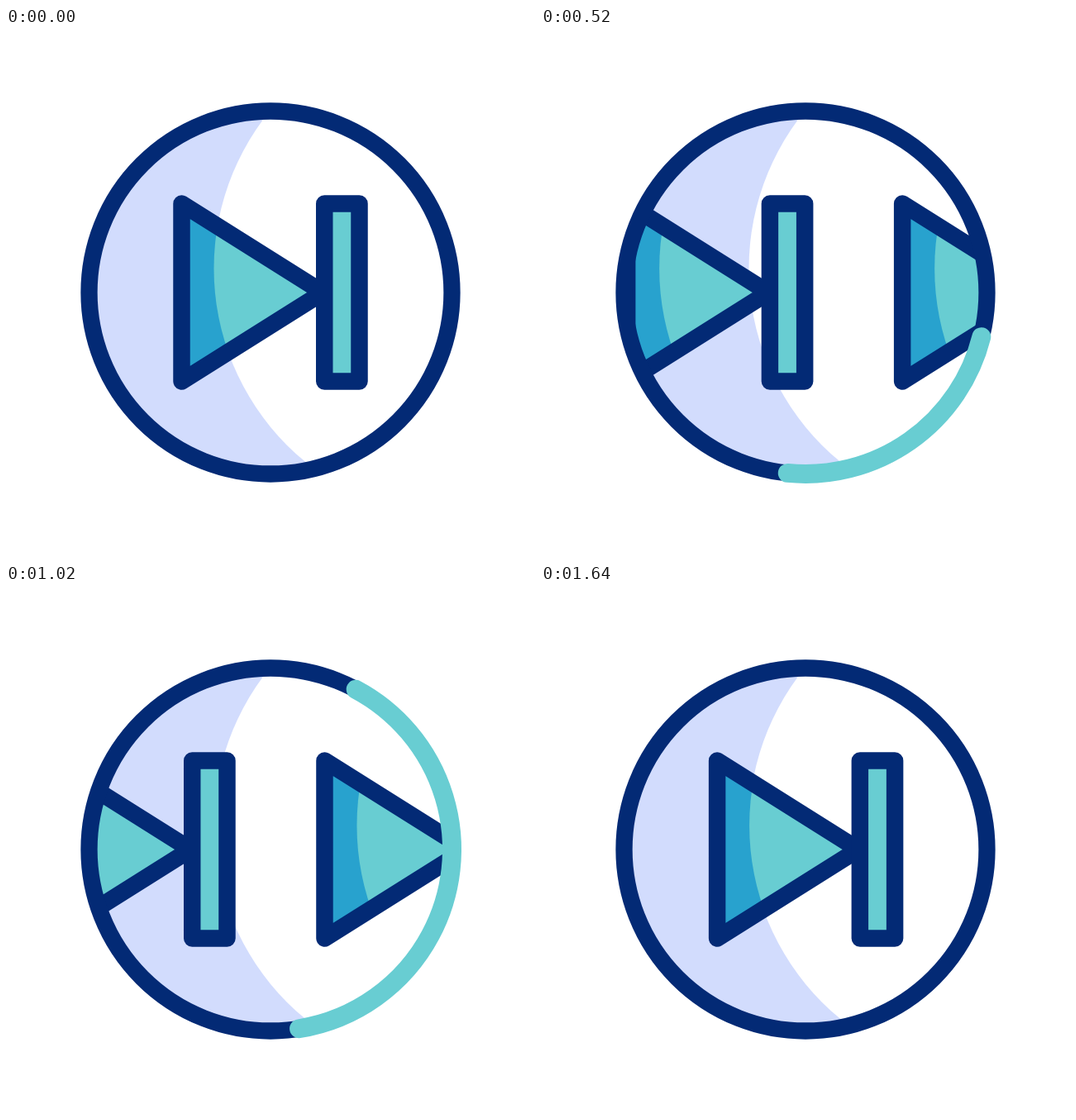
Recreate the animation shown at these times as an HTML page with a canvas. Size 640x640 px, loop 2.42 s.

```html
<!DOCTYPE html>
<html lang="en">
<head>
<meta charset="utf-8">
<title>Skip button</title>
<style>
  html, body { margin: 0; width: 100%; height: 100%; overflow: hidden; background: #fff; }
  canvas { display: block; width: 640px; height: 640px; }
</style>
</head>
<body>
<canvas id="stage" width="640" height="640"></canvas>
<script>
const ctx = document.getElementById('stage').getContext('2d');
const NAVY = '#032a75', TEAL = '#68cdd2', BLUE = '#28a2ce', LILAC = '#d2dcfd';
const LOOP = 2420, STEP = 20;
const C = 320, RADIUS = 219.5;
const SPACING = 333, TRAVEL = 1332.6, SCROLL_MS = 1600, SWEEP_MS = 1620;

// Cubic bezier easing with control points (x1, 0) and (x2, 1).
function ease(x, x1, x2) {
  if (x <= 0) return 0;
  if (x >= 1) return 1;
  let lo = 0, hi = 1;
  for (let i = 0; i < 30; i++) {
    const s = (lo + hi) / 2, r = 1 - s;
    if (3 * r * r * s * x1 + 3 * r * s * s * x2 + s * s * s < x) lo = s;
    else hi = s;
  }
  return lo * lo * (3 - 2 * lo);
}

function circlePath(x, y, r) {
  ctx.beginPath();
  ctx.arc(x, y, r, 0, Math.PI * 2);
}

function trianglePath() {
  ctx.beginPath();
  ctx.moveTo(212.5, 212.5);
  ctx.lineTo(383.4, 320);
  ctx.lineTo(212.5, 427.5);
  ctx.closePath();
}

// Fills the current path in two tones, split by a large circle.
function fillShaded(dark, light) {
  ctx.save();
  ctx.clip();
  ctx.fillStyle = dark;
  ctx.fillRect(0, 0, 640, 640);
  ctx.fillStyle = light;
  circlePath(554, 291, 302.5);
  ctx.fill();
  // The circle's far side stays light.
  ctx.fillRect(500, 0, 140, 640);
  ctx.restore();
}

function drawIcon(dx) {
  ctx.save();
  ctx.translate(dx, 0);
  ctx.lineWidth = 20.5;
  ctx.lineJoin = 'round';
  ctx.strokeStyle = NAVY;
  trianglePath();
  fillShaded(BLUE, TEAL);
  trianglePath();
  ctx.stroke();
  ctx.fillStyle = TEAL;
  ctx.beginPath();
  ctx.rect(385.25, 212.5, 42.25, 215);
  ctx.fill();
  ctx.stroke();
  ctx.restore();
}

function drawSweep(t) {
  if (t <= 0 || t >= SWEEP_MS) return;
  const u = t / SWEEP_MS, turn = Math.PI * 4, top = -Math.PI / 2;
  const head = turn * ease(u, 0.351, 0.58);
  const tail = turn * ease(u, 0.491, 0.788);
  ctx.strokeStyle = TEAL;
  ctx.lineWidth = 23;
  ctx.lineCap = 'round';
  ctx.beginPath();
  ctx.arc(C, C, RADIUS, top + tail, top + Math.max(head, tail + 0.001));
  ctx.stroke();
}

function draw(t) {
  ctx.fillStyle = '#fff';
  ctx.fillRect(0, 0, 640, 640);

  ctx.save();
  circlePath(C, C, RADIUS);
  ctx.clip();
  circlePath(C, C, RADIUS);
  fillShaded(LILAC, '#fff');
  const shift = TRAVEL * ease(t / SCROLL_MS, 0.334, 0.301);
  for (let i = 0; i <= 4; i++) {
    const dx = shift - i * SPACING;
    if (Math.abs(dx) < 400) drawIcon(dx);
  }
  ctx.restore();

  ctx.strokeStyle = NAVY;
  ctx.lineWidth = 20.3;
  circlePath(C, C, RADIUS);
  ctx.stroke();
  drawSweep(t);
}

const start = performance.now();
function tick() {
  const t = (performance.now() - start) % LOOP;
  draw(Math.floor(t / STEP) * STEP);
  requestAnimationFrame(tick);
}
tick();
</script>
</body>
</html>
```
